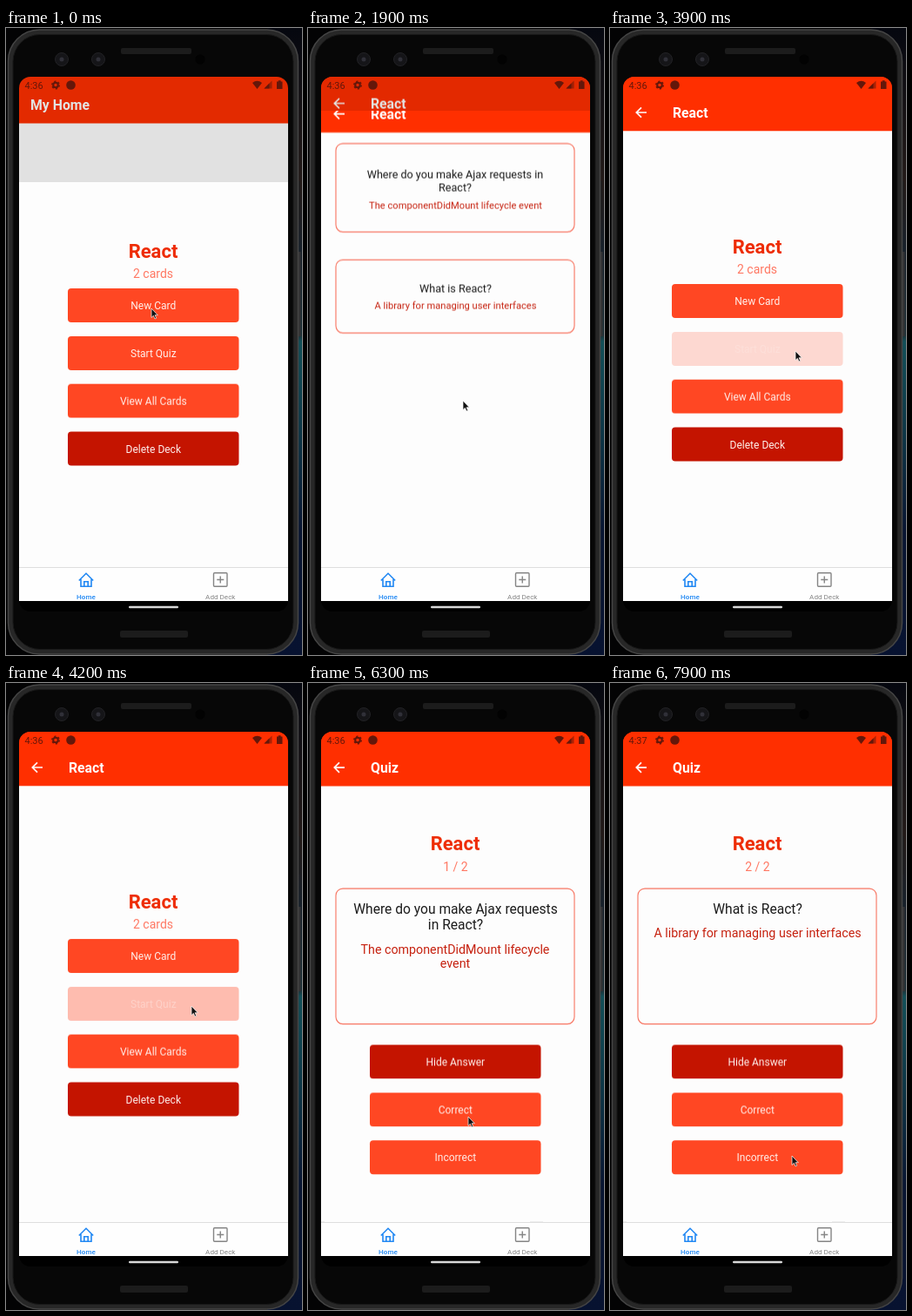
Animation, 340 px wide and 720 px high, one loop 8000 ms. Source, as an HTML page:

```html
<!DOCTYPE html>
<html lang="en">
<head>
<meta charset="utf-8">
<title>Flashcards</title>
<style>
html, body { margin: 0; width: 100%; height: 100%; overflow: hidden; background: #050507; }
.stage { position: absolute; left: 0; top: 0; width: 340px; height: 720px; overflow: hidden; }
svg { position: absolute; left: 0; top: 0; display: block; }
text { font-family: Roboto, "Noto Sans", sans-serif; }

/* screens */
.screen { position: absolute; left: 15px; top: 56px; width: 309px; height: 563px; overflow: hidden; border-radius: 13px 13px 0 0; }
.card, .inner, .under { position: absolute; left: 0; top: 0; width: 100%; height: 100%; }
.card { overflow: hidden; }
.under { background: #fdfdfd; }
.dim { fill: #000; opacity: 0; }
.bar { fill: #ff2f00; }
.head { font-size: 15.8px; font-weight: 700; fill: #fff; }
.back { fill: none; stroke: #fff; stroke-width: 1.7; }
.mid text, text.mid { text-anchor: middle; }
.title { font-size: 22px; font-weight: 700; fill: #ee2c04; }
.count { font-size: 14px; fill: #ff7762; }
.btn rect { width: 196.5px; height: 39px; rx: 4px; fill: #ff4723; }
.btn text { font-size: 12px; fill: #fff0ec; }
.btn.dark rect { fill: #c41400; }
.box { fill: #fdfdfd; stroke: #f8735f; stroke-width: 1.1; }
.ask { font-size: 15.6px; fill: #1c1c1c; }
.reply { font-size: 14.25px; fill: #c6210f; }
.small .ask { font-size: 12.6px; }
.small .reply { font-size: 11.13px; }
.tab { font-size: 8.1px; }

/* motion: one loop is 8 s, so 1% is 80 ms */
.card, .inner, .under, .dim, .press, .flip, .cursor { animation: 8s linear infinite; }
.flip { animation-timing-function: step-end; }

.deck.card { animation-name: deckCard; }
.deck > .inner { animation-name: deckInner; }
.list.card { animation-name: listCard; }
.list > .inner { animation-name: listInner; }
.quiz.card { animation-name: quizCard; }
.quiz > .inner { animation-name: quizInner; }
.home.under { animation-name: homeUnder; }
.deck .under { animation-name: deckUnder; }
.deck .dim { animation-name: deckDim; }
.home .dim { opacity: .11; }

@keyframes deckCard {
  0% { transform: translateY(21.8%); animation-timing-function: cubic-bezier(.181,.769,.457,1); }
  3.81%, 100% { transform: none; }
}
@keyframes deckInner {
  0% { transform: translateY(-20.9%); animation-timing-function: cubic-bezier(.181,.769,.457,1); }
  3.81%, 100% { transform: translateY(0); }
}
@keyframes homeUnder {
  0% { transform: translateY(-1.57%); animation-timing-function: cubic-bezier(.181,.769,.457,1); }
  3.81%, 100% { transform: translateY(-2%); }
}
@keyframes listCard {
  0%, 41.28%, 100% { transform: translateY(100%); }
  21.25% { transform: translateY(100%); animation-timing-function: cubic-bezier(.208,.82,.25,1); }
  26.56% { transform: translateY(0); }
  35.97% { transform: translateY(0); animation-timing-function: cubic-bezier(.208,.82,.25,1); }
}
@keyframes listInner {
  0%, 41.28%, 100% { transform: translateY(-95.9%); }
  21.25% { transform: translateY(-95.9%); animation-timing-function: cubic-bezier(.208,.82,.25,1); }
  26.56% { transform: translateY(0); }
  35.97% { transform: translateY(0); animation-timing-function: cubic-bezier(.208,.82,.25,1); }
}
@keyframes quizCard {
  0% { transform: translateY(100%); }
  52.5% { transform: translateY(100%); animation-timing-function: cubic-bezier(.208,.82,.25,1); }
  57.81%, 100% { transform: translateY(0); }
}
@keyframes quizInner {
  0% { transform: translateY(-95.9%); }
  52.5% { transform: translateY(-95.9%); animation-timing-function: cubic-bezier(.208,.82,.25,1); }
  57.81%, 100% { transform: translateY(0); }
}
@keyframes deckUnder {
  0%, 41.28% { transform: translateY(0); }
  21.25%, 52.5% { transform: translateY(0); animation-timing-function: cubic-bezier(.208,.82,.25,1); }
  26.56% { transform: translateY(-2%); }
  35.97% { transform: translateY(-2%); animation-timing-function: cubic-bezier(.208,.82,.25,1); }
  57.81%, 100% { transform: translateY(-2%); }
}
@keyframes deckDim {
  0%, 21.25%, 41.28%, 52.5% { opacity: 0; }
  21.8%, 37.2%, 53.05%, 100% { opacity: .11; }
}

.view { animation-name: pressView; }
.start { animation-name: pressStart; }
.reveal { animation-name: pressReveal; }
.right { animation-name: pressRight; }
/* a pressed label fades further than its button */
.view text, .start text, .right text { animation: inherit; }
@keyframes pressView {
  0%, 17.5%, 23.75%, 100% { opacity: 1; }
  18.5%, 20.6% { opacity: .2; }
}
@keyframes pressStart {
  0%, 47.5%, 55%, 100% { opacity: 1; }
  48.2%, 51.9% { opacity: .2; }
}
@keyframes pressReveal {
  0%, 70%, 74.4%, 88.75%, 93.1%, 100% { opacity: 1; }
  71%, 71.9%, 89.75%, 90.6% { opacity: .2; }
}
@keyframes pressRight {
  0%, 80.6%, 86.2%, 100% { opacity: 1; }
  81.6%, 83.1% { opacity: .2; }
}

.first { animation-name: first; }
.second { animation-name: second; }
.answer1 { animation-name: answer1; }
.answer2 { animation-name: answer2; }
.show { animation-name: show; }
.hide { animation-name: hide; }
.before { animation-name: before; }
.after { animation-name: after; }
@keyframes first { 0% { opacity: 1; } 83.125%, 100% { opacity: 0; } }
@keyframes second { 0% { opacity: 0; } 83.125%, 100% { opacity: 1; } }
@keyframes answer1 { 0% { opacity: 0; } 71.875%, 100% { opacity: 1; } }
@keyframes answer2 { 0% { opacity: 0; } 90.625%, 100% { opacity: 1; } }
@keyframes show { 0%, 83.125% { opacity: 1; } 71.875%, 90.625%, 100% { opacity: 0; } }
@keyframes hide { 0%, 83.125% { opacity: 0; } 71.875%, 90.625%, 100% { opacity: 1; } }
@keyframes before { 0% { opacity: 1; } 85%, 100% { opacity: 0; } }
@keyframes after { 0% { opacity: 0; } 85%, 100% { opacity: 1; } }

.cursor { animation-name: point; animation-timing-function: ease-in-out; }
@keyframes point {
  0%, 5% { transform: translate(167px, 322px); }
  16%, 24% { transform: translate(178px, 428px); }
  33.5%, 37.5% { transform: translate(29.5px, 97px); }
  46.5%, 56% { transform: translate(213px, 371px); }
  64%, 65.5% { transform: translate(202px, 485px); }
  69.5%, 73% { transform: translate(191px, 438px); }
  78%, 83.5% { transform: translate(184px, 498px); }
  88%, 92% { transform: translate(194px, 439px); }
  98%, 100% { transform: translate(209px, 543px); }
}
</style>
</head>
<body>
<div class="stage">
  <!-- desktop edge and phone body -->
  <svg width="340" height="720">
    <defs>
      <linearGradient id="edge" x2="0" y2="1">
        <stop offset="0" stop-color="#05070f"/>
        <stop offset=".25" stop-color="#231a18"/>
        <stop offset=".35" stop-color="#17202a"/>
        <stop offset=".49" stop-color="#1c3138"/>
        <stop offset=".5" stop-color="#125059"/>
        <stop offset=".65" stop-color="#0c3546"/>
        <stop offset=".8" stop-color="#081532"/>
        <stop offset="1" stop-color="#071230"/>
      </linearGradient>
    </defs>
    <rect width="340" height="720" fill="#030304"/>
    <rect x="300" width="40" height="720" fill="url(#edge)"/>
    <rect x="335" y="176" width="2.5" height="44" fill="#1b1b1d"/>
    <rect x="335" y="257" width="3.5" height="97" fill="#333335"/>
    <rect x="2.500" y="2" width="333" height="717" rx="36" fill="#272727" stroke="#454545" stroke-width="1.500"/>
    <rect x="8" y="7.500" width="322" height="706" rx="31" fill="#070707" stroke="#191919"/>
    <rect x="132" y="23" width="81" height="7" rx="2" fill="#1c1c1c"/>
    <rect x="131" y="692" width="78" height="8" rx="2" fill="#1c1c1c"/>
    <g fill="#151518" stroke="#222225">
      <circle cx="64" cy="36" r="7.500"/>
      <circle cx="106" cy="36" r="7.500"/>
    </g>
    <g fill="#303038"><circle cx="64" cy="36" r="2.500"/><circle cx="106" cy="36" r="2.500"/></g>
    <circle cx="223" cy="36" r="5.500" fill="#020202"/>
    <rect x="15" y="57" width="309" height="613" rx="13" fill="#000"/>
  </svg>

  <div class="screen">
    <div class="home under">
      <svg width="309" height="563" viewBox="15 56 309 563">
        <path class="bar" d="M15 56H324V118.300H15Z"/>
        <text class="head" x="28" y="102.800">My Home</text>
        <path class="dim" d="M15 56H324V640H15Z"/>
      </svg>
    </div>

    <div class="deck card"><div class="inner"><div class="under">
      <svg width="309" height="563" viewBox="15 56 309 563">
        <path class="bar" d="M15 56H324V118.300H15Z"/>
        <path class="back" d="M42 97H30.500M36 91.300L30.300 97L36 102.700"/>
        <text class="head" x="72" y="102.800">React</text>
        <g class="mid">
          <text class="title" x="169" y="259">React</text>
          <text class="count" x="169" y="282">2 cards</text>
          <g class="btn" transform="translate(71 294)"><rect/><text x="98.300" y="24">New Card</text></g>
          <g class="btn press start" transform="translate(71 349)"><rect/><text x="98.300" y="24">Start Quiz</text></g>
          <g class="btn press view" transform="translate(71 403.700)"><rect/><text x="98.300" y="24">View All Cards</text></g>
          <g class="btn dark" transform="translate(71 458.600)"><rect/><text x="98.300" y="24">Delete Deck</text></g>
        </g>
        <path class="dim" d="M15 56H324V640H15Z"/>
      </svg>
    </div></div></div>

    <div class="list card"><div class="inner"><div class="under" style="animation: none">
      <svg width="309" height="563" viewBox="15 56 309 563">
        <path class="bar" d="M15 56H324V118.300H15Z"/>
        <path class="back" d="M42 97H30.500M36 91.300L30.300 97L36 102.700"/>
        <text class="head" x="72" y="102.800">React</text>
        <g class="mid small">
          <rect class="box" x="32" y="131" width="274" height="101.500" rx="8"/>
          <text class="ask" x="169" y="170.500">Where do you make Ajax requests in</text>
          <text class="ask" x="169" y="186.300">React?</text>
          <text class="reply" x="169.500" y="205.800">The componentDidMount lifecycle event</text>
          <rect class="box" x="32" y="264.500" width="274" height="84" rx="8"/>
          <text class="ask" x="169.500" y="301.800">What is React?</text>
          <text class="reply" x="169.500" y="321.300">A library for managing user interfaces</text>
        </g>
      </svg>
    </div></div></div>

    <div class="quiz card"><div class="inner"><div class="under" style="animation: none">
      <svg width="309" height="563" viewBox="15 56 309 563">
        <path class="bar" d="M15 56H324V118.300H15Z"/>
        <path class="back" d="M42 97H30.500M36 91.300L30.300 97L36 102.700"/>
        <text class="head" x="72" y="102.800">Quiz</text>
        <g class="mid">
          <text class="title" x="169" y="192.300">React</text>
          <rect class="box" x="32" y="236" width="274" height="155.500" rx="8"/>
          <g class="flip first">
            <text class="count" x="169.500" y="216">1 / 2</text>
            <text class="ask" x="169.500" y="264.700">Where do you make Ajax requests</text>
            <text class="ask" x="169.500" y="283.200">in React?</text>
            <g class="flip answer1">
              <text class="reply" x="169" y="310.500">The componentDidMount lifecycle</text>
              <text class="reply" x="169" y="327">event</text>
            </g>
          </g>
          <g class="flip second">
            <text class="count" x="169.500" y="216">2 / 2</text>
            <text class="ask" x="169.500" y="264.700">What is React?</text>
            <text class="reply flip answer2" x="169.500" y="292">A library for managing user interfaces</text>
          </g>
          <g class="btn dark press reveal" transform="translate(71 415.500)">
            <rect/>
            <text class="flip show" x="98.300" y="24">Show Answer</text>
            <text class="flip hide" x="98.300" y="24">Hide Answer</text>
          </g>
          <g class="btn press right" transform="translate(71 470.500)"><rect/><text x="98.300" y="24">Correct</text></g>
          <g class="btn" transform="translate(71 525.200)"><rect/><text x="98.300" y="24">Incorrect</text></g>
        </g>
      </svg>
    </div></div></div>
  </div>

  <!-- status bar, tabs and pointer -->
  <svg width="340" height="720">
    <g fill="#64170a">
      <g font-size="11">
        <text class="flip before" x="21.500" y="69.500">4:36</text>
        <text class="flip after" x="21.500" y="69.500">4:37</text>
      </g>
      <circle cx="57" cy="65.500" r="2.800" fill="none" stroke="#64170a" stroke-width="2.100"/>
      <circle cx="57" cy="65.500" r="4.300" fill="none" stroke="#64170a" stroke-width="1.300" stroke-dasharray="2.250"/>
      <circle cx="74.500" cy="65.500" r="5.300"/>
      <path d="M283 63Q288.500 58.500 294 63L288.500 70Z"/>
      <path d="M296.500 69.500L305.500 60.500V69.500Z" fill-opacity=".55"/>
      <path d="M296.500 69.500L302.500 63.500V69.500Z"/>
      <path d="M311 61.500H312.800V60.300H315.700V61.500H317.500V70H311Z"/>
    </g>
    <path d="M15 619H324V658H15Z" fill="#fefefe"/>
    <path d="M15 619.500H324" stroke="#dedede"/>
    <g fill="none" stroke="#2188f3" stroke-width="1.600">
      <path d="M83.800 634.500L92 626.300L100.200 634.500M86 633V641.300H98V633"/>
      <path d="M89.800 641V635.800H94.200V641"/>
    </g>
    <g fill="none" stroke="#858585" stroke-width="1.400">
      <rect x="238.500" y="625.700" width="15.500" height="15.500" rx="1"/>
      <path d="M246.250 629.500V637.500M242.250 633.500H250.250"/>
    </g>
    <text class="tab mid" x="92" y="656" fill="#2188f3" font-weight="500">Home</text>
    <text class="tab mid" x="246.300" y="656" fill="#858585">Add Deck</text>
    <rect x="141" y="663.800" width="57" height="2.400" rx="1.200" fill="#d8d8d8"/>
    <path class="cursor" d="M0 0V10.500L2.400 8.300L4 12L5.700 11.200L4.100 7.700H7.300Z" fill="#111" stroke="#fff" stroke-width=".7"/>
  </svg>
</div>
</body>
</html>
```
